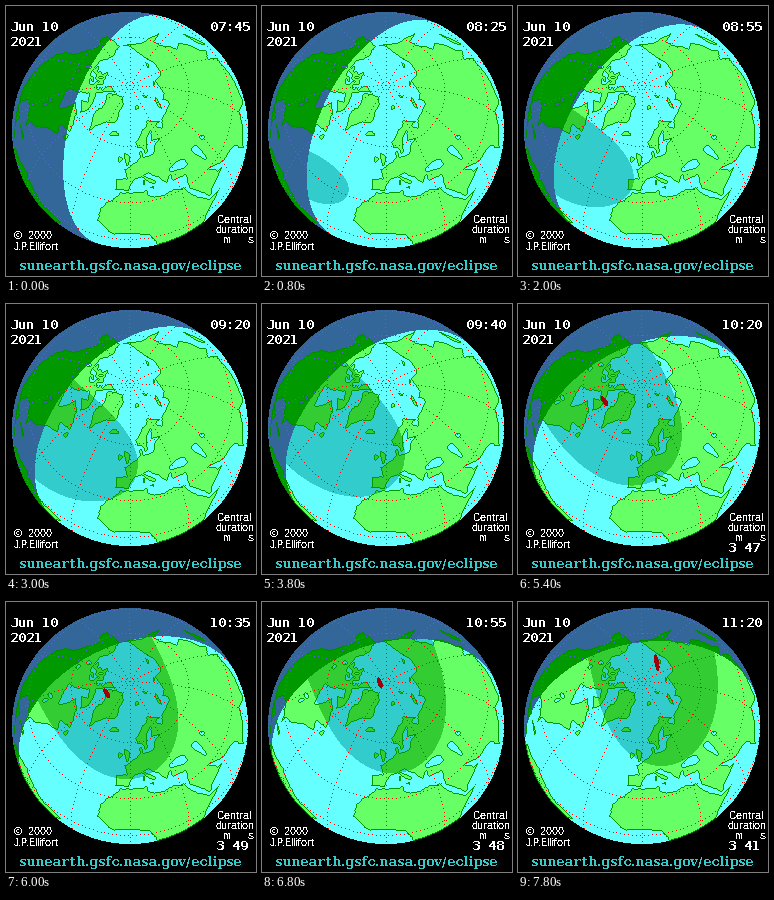
These frames come from a looping animation (250x270 px, 8 s). A matplotlib script:

```python
import matplotlib.pyplot as plt
import numpy as np
from matplotlib.animation import FuncAnimation
from matplotlib.path import Path

W, H = 250, 270
CX, CY, R = 124, 124, 118
LAT0 = np.radians(68)
DECL = np.radians(23.03)
STEPS, INTERVAL = 40, 200
rng = np.random.default_rng(7)

plt.rcParams["text.antialiased"] = False
plt.rcParams["text.hinting"] = "default"
plt.rcParams["text.hinting_factor"] = 1

# Key points of the big coasts as longitude, latitude; the rest is roughened
EURASIA = [
    -9, 37, -9, 43, -1.5, 43.5, -4.5, 48.3, 4, 52, 8, 54, 8, 57, 10.5, 57.5,
    11, 54, 20, 54.7, 23, 58.5, 30, 60, 21.5, 61, 25, 65.5, 17, 61.5,
    16, 56.5, 13, 55.5, 10.5, 59, 6, 58.5, 5, 62, 13, 66, 26, 71, 41, 67,
    33, 66.5, 38, 64, 44, 67.5, 68, 69, 68, 73, 80, 73, 104, 77.5, 113, 74,
    140, 72.5, 190, 66, 163, 60, 157, 51, 156, 60, 136, 55, 140, 50, 129, 42,
    127, 35, 121, 40, 122, 30, 108, 20, 100, 13, 91, 22, 80, 13, 77, 8,
    72, 21, 57, 26, 49, 30, 54, 24, 59, 22, 45, 13, 35, 28, 36, 36.5,
    27, 37, 27, 41, 23, 37.5, 19, 42, 13, 45.5, 8, 44, 3, 43, -1, 37]
AFRICA = [
    -6, 36, 10, 37, 11, 33.5, 20, 31, 32, 31, 37, 21, 43, 11.5, 51, 12,
    40, -5, 40, -20, 15, -30, 13, -8, 9, 4, -8, 4.5, -17, 14.5, -16, 24,
    -10, 31]
AMERICA = [
    -56, 52, -65, 60, -78, 62, -77, 57, -79, 52, -94, 59, -87, 65, -82, 69,
    -95, 70, -115, 69, -135, 69, -156, 71, -168, 66, -160, 56, -146, 60.5,
    -130, 54, -124, 40, -105, 20, -80, 8, -88, 16, -88, 21, -96, 19,
    -95, 29.5, -84, 30, -80.5, 25, -81, 31, -70, 42, -62, 46, -66, 50]
BRAZIL = [-77, 8, -62, 10.5, -50, 0, -35, -6, -48, -28, -81, -5]
GREENLAND = [-44, 60, -40, 65, -22, 70.5, -18, 80, -30, 83.5, -62, 81.5,
             -72, 78, -58, 75.5, -53, 67]
BAFFIN = [-65, 62, -77, 64.5, -72, 68, -88, 70, -88, 73.5, -70, 71, -62, 66.5]
ELLESMERE = [-80, 76.3, -90, 78, -92, 81, -64, 83, -75, 79]

# Small shapes: longitude, latitude, half length and width in px, tilt
ISLANDS = {
    "Britain": (-2.5, 53.7, 6.5, 2.8, 100),
    "Ireland": (-8, 53.3, 3, 2.4, 90),
    "Iceland": (-18.5, 65, 4.6, 2.8, 0),
    "Novaya Zemlya": (59, 74, 6.8, 1.6, 118),
    "Svalbard": (17, 78.5, 3, 2, 60),
    "Newfoundland": (-56, 49, 3, 2.2, 45),
    "Italy": (12.5, 42, 8.5, 2, -27),
    "Sardinia": (9, 41, 3.2, 1.1, 90),
    "Sicily": (14, 37.5, 2, 1.2, 0),
    "Japan": (136.5, 37, 12, 1.5, 153),
    "Cuba": (-79.5, 21.5, 8, 1, -80),
}
SEAS = {
    "Black": (34.5, 43.2, 9, 3.8, 27),
    "Caspian": (51, 41.7, 8.5, 3, -41),
    "Aral": (60, 45, 2, 1.5, 0),
    "Superior": (-88, 47.6, 3, 1.2, -60),
    "Michigan": (-86.5, 44, 3, 1.2, 20),
    "Great Bear": (-121, 66, 2, 1.5, 0),
    "Great Slave": (-113, 61.5, 2.5, 1, 60),
}


def to_view(lon, lat):
    """Unit vector (right, up, toward the viewer) of a place."""
    lon, lat = np.radians(lon), np.radians(lat)
    e, n, q = np.cos(lat) * np.sin(lon), np.sin(lat), np.cos(lat) * np.cos(lon)
    return (e, n * np.cos(LAT0) - q * np.sin(LAT0),
            n * np.sin(LAT0) + q * np.cos(LAT0))


def flatten(x, y, z):
    """Azimuthal equidistant plane, which also holds places past the limb."""
    k = np.arccos(np.clip(z, -1, 1)) / np.maximum(np.hypot(x, y), 1e-9)
    return np.column_stack([(x * k).ravel(), (y * k).ravel()])


col, row = np.meshgrid(np.arange(W) + .5, np.arange(H) + .5)
VX, VY = (col - CX) / R, (CY - row) / R
GLOBE = VX**2 + VY**2 <= 1
VZ = np.sqrt(np.clip(1 - VX**2 - VY**2, 0, 1))
EAST = VX
NORTH = VY * np.cos(LAT0) + VZ * np.sin(LAT0)
FRONT = VZ * np.cos(LAT0) - VY * np.sin(LAT0)
PLANE = flatten(VX, VY, VZ)


def roughen(pts, levels=3, amount=.07):
    """Midpoint displacement along a closed outline."""
    for _ in range(levels):
        step = np.roll(pts, -1, 0) - pts
        normal = step[:, ::-1] * [-1, 1]
        shift = rng.normal(0, amount, (len(pts), 1))
        mid = pts + step / 2 + normal * shift
        pts = np.stack([pts, mid], 1).reshape(-1, 2)
    return pts


def coast(shape):
    pts = np.array(shape, float).reshape(-1, 2)
    outline = roughen(flatten(*to_view(pts[:, 0], pts[:, 1])))
    return Path(outline).contains_points(PLANE).reshape(H, W)


def blob(lon, lat, a, b, tilt):
    """Ellipse on the picture with a wavy rim."""
    x, y, _ = to_view(lon, lat)
    dx, dy, t = (VX - x) * R, (VY - y) * R, np.radians(tilt)
    u = (dx * np.cos(t) + dy * np.sin(t)) / a
    v = (dy * np.cos(t) - dx * np.sin(t)) / b
    wave = np.sin(3 * np.arctan2(v, u) + rng.uniform(0, 6.28))
    return u**2 + v**2 < 1 + .3 * wave


def land_mask():
    land = np.zeros((H, W), bool)
    for shape in (EURASIA, AFRICA, AMERICA, BRAZIL, GREENLAND, BAFFIN,
                  ELLESMERE):
        land |= coast(shape)
    for shape in ISLANDS.values():
        land |= blob(*shape)
    for lat in (70.5, 73.3, 76):
        for lon in range(-118, -84, 11):
            land |= blob(lon + rng.normal(0, 2), lat + rng.normal(0, .4),
                         rng.uniform(3, 4.2), rng.uniform(1.8, 2.8),
                         rng.uniform(0, 180))
    for lon in (53, 98, 143):
        land |= blob(lon, 84 - lon / 17, 2.5, 1.3, rng.uniform(0, 180))
    for shape in SEAS.values():
        land &= ~blob(*shape)
    return land & GLOBE


def edge(mask):
    near = mask.copy()
    for step, axis in ((1, 0), (-1, 0), (1, 1), (-1, 1)):
        near &= np.roll(mask, step, axis) | ~GLOBE
    return mask & ~near


def dot_line(mask, lon, lat, gap=4):
    x, y, z = to_view(lon, lat)
    px, py = CX + R * x, CY - R * y
    run = np.cumsum(np.hypot(np.diff(px, prepend=px[0]),
                             np.diff(py, prepend=py[0])))
    keep = (np.diff(run // gap, prepend=-1) > 0) & (z > 0)
    mask[py[keep].astype(int), px[keep].astype(int)] = True


def graticule():
    mask = np.zeros((H, W), bool)
    lat = np.linspace(90, -40, 2000)
    for lon in range(-180, 180, 30):
        dot_line(mask, np.full(lat.shape, lon), lat)
    lon = np.linspace(-180, 180, 4000)
    for par in (0, 30, 60):
        dot_line(mask, lon, np.full(lon.shape, par))
    return mask & GLOBE


LAND = land_mask()
COAST = edge(LAND)
GRID = graticule()

# ocean, land, coast, graticule for each kind of light
DAY = (102, 255, 255), (102, 255, 102), (0, 153, 0), (255, 0, 0)
SHADE = (51, 204, 204), (51, 204, 51), (0, 153, 0), (255, 0, 0)
NIGHT = (51, 102, 153), (0, 153, 0), (0, 140, 0), (90, 100, 215)
SPOT = (160, 0, 10)

GREATEST, SPEED, GAMMA = 10.698, .507, .9152
TILT = np.radians(10.2)
PENUMBRA, CORE = .56, .02


def shadow_axis(hour):
    s = (hour - GREATEST) * SPEED
    return (s * np.cos(TILT) - GAMMA * np.sin(TILT),
            s * np.sin(TILT) + GAMMA * np.cos(TILT))


def paint(img, where, colors):
    for part, color in zip((GLOBE, LAND, COAST, GRID), colors):
        img[where & part] = color


def globe(hour):
    sun = np.radians((12 - hour) * 15 - .15)
    x = EAST * np.cos(sun) - FRONT * np.sin(sun)
    q = FRONT * np.cos(sun) + EAST * np.sin(sun)
    y = NORTH * np.cos(DECL) - q * np.sin(DECL)
    lit = NORTH * np.sin(DECL) + q * np.cos(DECL) > 0
    ax_x, ax_y = shadow_axis(hour)
    dist = np.hypot(x - ax_x, y - ax_y)

    img = np.zeros((H, W, 3), np.uint8)
    paint(img, ~lit, NIGHT)
    paint(img, lit, DAY)
    paint(img, lit & (dist < PENUMBRA), SHADE)
    img[GLOBE & lit & (dist < CORE)] = SPOT
    return img


def minute_of(i):
    """Quarter hours before first contact, five-minute steps after it."""
    return min(465 + 15 * i, 485 + 5 * i)


def duration(minute):
    """Central phase as minutes and seconds, blank off its path."""
    if np.hypot(*shadow_axis(minute / 60)) >= 1:
        return ""
    sec = int(229.5 - 8.5 * ((minute - 640) / 40) ** 2)
    return f"{sec // 60} {sec % 60:02d}"


fig = plt.figure(figsize=(W / 100, H / 100), dpi=100, facecolor="black")
ax = fig.add_axes([0, 0, 1, 1])
ax.axis("off")
picture = ax.imshow(globe(minute_of(0) / 60), extent=(0, W, H, 0),
                    interpolation="nearest", aspect="auto")
ax.set_xlim(0, W)
ax.set_ylim(H, 0)


def label(x, y, text, px=11, font="Liberation Sans", **style):
    style = {"color": "white", **style}
    return ax.text(x, y, text, fontsize=px * .72, family=font,
                   va="baseline", **style)


def big(x, y, text=""):
    return label(x, y, text, 13.2, "DejaVu Sans Mono", weight="bold")


big(4, 25, "Jun 10")
big(4, 40, "2021")
clock = big(204, 25)
central = big(210, 248)
label(8, 233, "©  2000")
label(8, 244, "J.P.Ellifort")
label(211, 217, "Central")
label(210, 227, "duration")
label(217, 237, "m")
label(242, 237, "s")
label(123.5, 264, "sunearth.gsfc.nasa.gov/eclipse", 13.2, "DejaVu Serif",
      weight="bold", color="#33cccc", ha="center")


def update(i):
    minute = minute_of(i)
    picture.set_data(globe(minute / 60))
    clock.set_text(f"{minute // 60:02d}:{minute % 60:02d}")
    central.set_text(duration(minute))
    return picture, clock, central


anim = FuncAnimation(fig, update, frames=STEPS, interval=INTERVAL,
                     repeat=True, repeat_delay=0)
plt.show()
```
